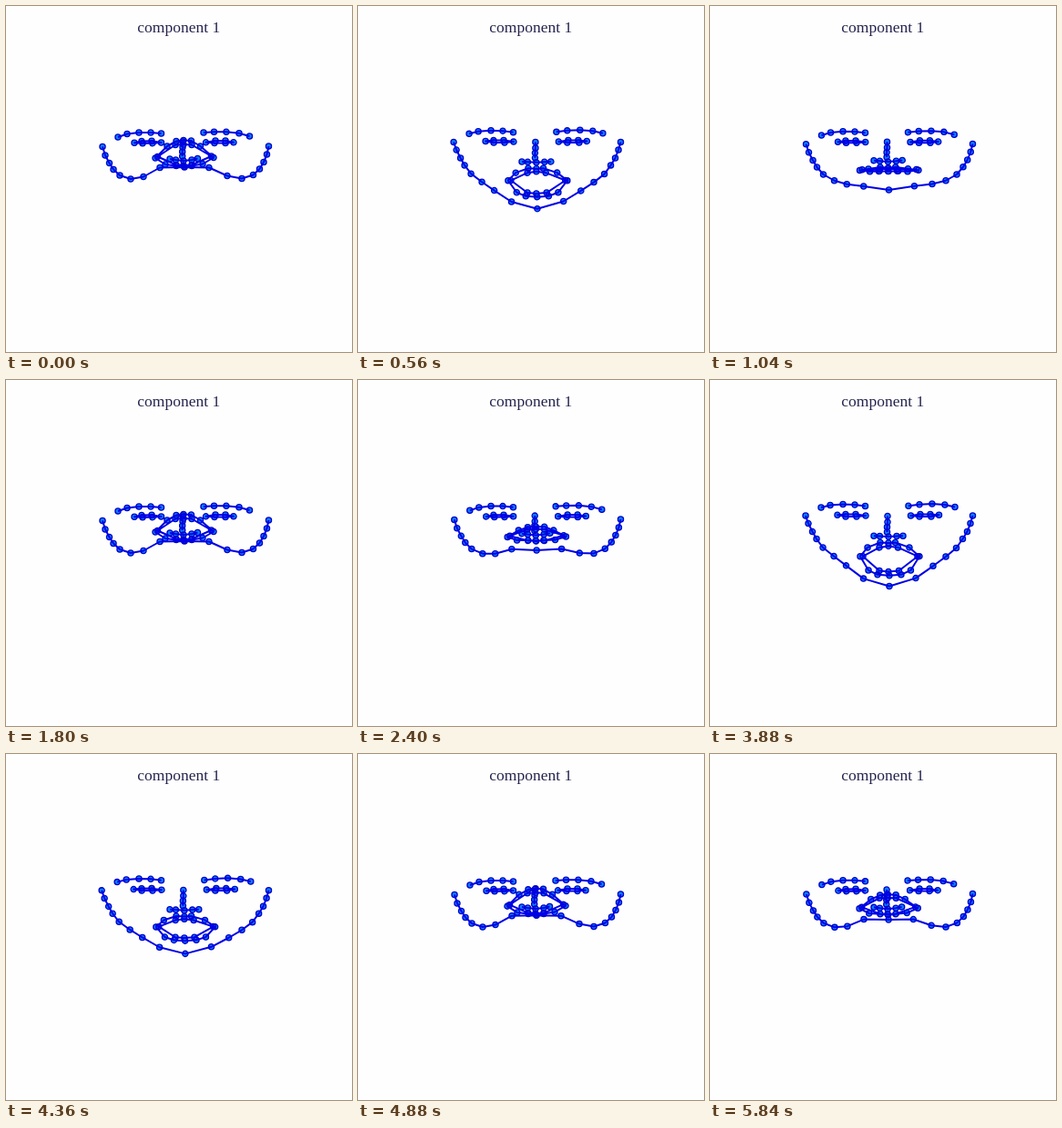
These frames come from a looping animation (380x380 px, 5.88 s). An HTML page:

```html
<!DOCTYPE html>
<html lang="en">
<head>
<meta charset="utf-8">
<title>component 1</title>
<style>
html, body { margin: 0; width: 100%; height: 100%; overflow: hidden; background: #fefefe; }
svg { display: block; width: 380px; height: 380px; }
text { font: 17.5px "Liberation Serif", "Times New Roman", serif; fill: #24244f; text-anchor: middle; }
#dots { fill: #0a80ff; stroke: #0000c8; stroke-width: 1.3; }
#lines { fill: none; stroke: #0000e6; stroke-width: 2; stroke-linejoin: round; }
</style>
</head>
<body>
<svg viewBox="0 0 380 380">
  <text x="189.7" y="29">component 1</text>
  <path id="dots"/>
  <path id="lines"/>
</svg>
<script>
const LOOP = 5880, STEP = 40, R = 3.1;

// Each feature is given at component weight -1 and +1.
const points = s => s.split(' ').map(p => p.split(',').map(Number));
const feature = (low, high, closed = false) => ({ low: points(low), high: points(high), closed });

const jaw = feature(
  '106,154.5 109,164 113.5,172.5 118,179.5 125,186 137,190 151,187.5 169,177.5 196,177 223,177.5 243,186.5 259,189.5 271.5,185.5 278.5,179 283,171.5 286.5,163 288.5,154',
  '105,149 108,157.5 112.5,166.5 117,174.5 124,184 136,193.5 149.5,204 168.5,218.5 197,227 226,218 245,204.5 259,194 270.5,184.5 277.5,174.5 282.5,166.5 286,157.5 288.5,149');
const leftBrow = feature(
  '123,144 133,140.5 146,139 159,139 170.5,140',
  '122,140 132,137.5 146,136.5 159,137 170.5,138.5');
const rightBrow = feature(
  '217,139 228.5,138.3 242,138.3 256,139.7 267.5,143',
  '218,138.3 230,136.7 244,136 258,137 269,139.5');
const bridge = feature(
  '194,149 194,155 193.7,160 193.7,165',
  '195,149.5 195,156 194.5,161.5 194.5,167');
const nostrils = feature(
  '180,168 186.5,169 195,170 204,169 210.5,167.5',
  '180,171.3 186.5,171.5 196,172 205,171.5 212,171.3');
const leftEye = feature(
  '141,150.3 149,148.5 160,148.3 170.5,150 161,150.7 150,150.7',
  '140,148.3 149,147.5 160,147.5 171,149 161,150 149,150', true);
const rightEye = feature(
  '219.5,149.8 230,148 241,148 250,149.8 241,150.5 229,150.5',
  '220.5,149 231,147.5 242,147.5 251.5,148.3 243,150 230,150', true);
const outerLip = feature(
  '164,167 175,174 187,175.5 195.5,176.5 204,175.5 216,173.5 228,166.5 213.5,154 203.5,148 195,147.5 187,148.5 177,154',
  '165,194 173,184 187,178.5 196,179 203.5,178.5 219,184 230,194 220.5,209.5 210,214.5 197,215.5 184,214.5 174,209.5', true);
const innerLip = feature(
  '166.5,165.5 187,174.5 195,175 204,174.5 225.5,165 204,152.5 195,152 186,152.5',
  '168,194 186,184 196,182.5 206.5,184 228,194 207.5,210 196,211 186,210', true);

const face = [jaw, leftBrow, rightBrow, bridge, nostrils, leftEye, rightEye, outerLip, innerLip];

// Component weight over time: [ms, weight]
const keys = [
  [0, -1], [640, .9], [1040, 0], [1360, .8], [1800, -1], [2080, -1.04], [2400, -.6],
  [2960, 1], [3420, 1.04], [3880, .98], [4240, .85], [4880, -.99], [5240, .4], [5840, -.8], [LOOP, -1]
];

function weight(t) {
  const i = keys.findIndex(k => k[0] > t);
  const [t0, a] = keys[i - 1], [t1, b] = keys[i];
  return a + (b - a) * (1 - Math.cos(Math.PI * (t - t0) / (t1 - t0))) / 2;
}

const mix = (a, b, u) => (a + (b - a) * u).toFixed(2);
const dot = ([x, y]) => `M${x - R},${y}a${R},${R} 0 1 0 ${2 * R},0a${R},${R} 0 1 0 ${-2 * R},0z`;

const dots = document.getElementById('dots');
const lines = document.getElementById('lines');
const start = performance.now();

function draw() {
  const t = Math.floor((performance.now() - start) % LOOP / STEP) * STEP;
  const u = (weight(t) + 1) / 2;
  let dotPath = '', linePath = '';
  for (const { low, high, closed } of face) {
    const pts = low.map(([x, y], i) => [mix(x, high[i][0], u), mix(y, high[i][1], u)]);
    dotPath += pts.map(dot).join('');
    linePath += 'M' + pts.join('L') + (closed ? 'z' : '');
  }
  dots.setAttribute('d', dotPath);
  lines.setAttribute('d', linePath);
  requestAnimationFrame(draw);
}
draw();
</script>
</body>
</html>
```
